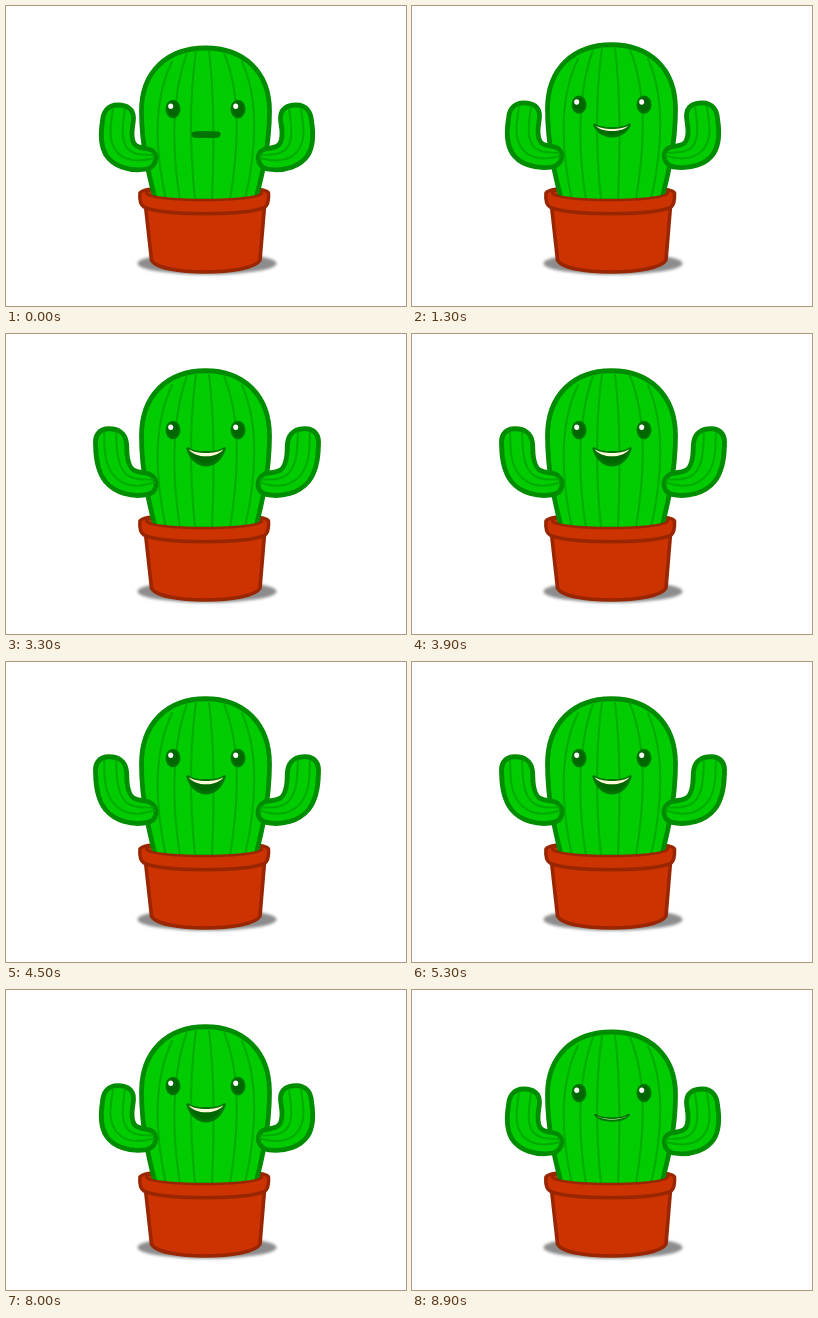
An HTML page that plays this animation: 400 px wide and 300 px high, repeating every 9000 ms.

```html
<!DOCTYPE html>
<html lang="en">
<head>
<meta charset="utf-8">
<title>Cactus</title>
<style>
  html, body { margin: 0; width: 100%; height: 100%; overflow: hidden; background: #fff; }
  svg { display: block; width: 100%; height: 100%; }
  .skin { fill: #0c0; stroke: #008c00; stroke-width: 4.8; stroke-linejoin: round; }
  .stripe { fill: none; stroke: #00ab00; stroke-width: 2; stroke-linecap: round; }
  .clay { fill: #c30; stroke: #992600; stroke-width: 3.6; stroke-linejoin: round; }
  .dark { fill: #060; stroke: #007400; stroke-linejoin: round; stroke-linecap: round; }
  .rim { fill: none; stroke: #992600; stroke-width: 2.4; }
</style>
</head>
<body>
<svg viewBox="0 0 400 300">
  <defs>
    <filter id="blur" x="-10%" y="-50%" width="120%" height="200%"><feGaussianBlur stdDeviation="1.6"/></filter>
    <clipPath id="abovePot"><path d="M0 0H400V187H256A58 7 0 0 1 140 187H0Z"/></clipPath>
    <g id="arm">
      <path class="skin" d="M112 99C101 99 97 107 96.500 115C94.500 127 94 139 100 149C107 160 123 166 141 163C152 160 153 145 142 143C130 141 126 140 126 127C126 121 127.500 117 127.500 112C127.500 103 121 99 112 99Z"/>
      <path class="stripe" d="M107 103C104 122 102 135 111 146C120 156 134 156 148 152M119 103C116 122 115 136 122 143C128 149 138 149 147 149"/>
    </g>
    <g id="eye">
      <ellipse class="dark" rx="6.500" ry="8.200" stroke-width="2"/>
      <ellipse cx="-2.300" cy="-2.700" rx="2.500" ry="2.700" fill="#fff"/>
    </g>
  </defs>

  <ellipse cx="201" cy="257.500" rx="69.500" ry="11" fill="#8c8c8c" filter="url(#blur)"/>
  <g id="figure">
    <path class="clay" d="M139.500 200L145.500 254C152 270 246 270 254 254L258.500 200Z"/>
    <path class="clay" d="M134 187C136 178 262 178 262.500 187Q263 198 259 201C242 210 156 210 138 201Q133 198 134 187Z"/>
    <ellipse class="rim" cx="198" cy="187" rx="58" ry="6"/>
    <g clip-path="url(#abovePot)">
      <g id="body">
        <path class="skin" d="M151 200C143 170 135.500 140 135.500 105C135.500 65 162 42 199.500 42C237 42 263.500 65 263.500 105C263.500 140 256 170 248 200Z"/>
        <path class="stripe" d="M166 56C148 92 148 140 160 194M181 47C165 90 166 145 174 194M190 45C183 95 184 145 189 194M203 45C209 95 208 145 206 194M218 47C236 90 232 145 224 194M236 56C254 95 250 145 239 194"/>
      </g>
    </g>
    <path class="rim" d="M140 187A58 7 0 0 0 256 187"/>
    <g id="face">
      <use href="#eye" x="167"/>
      <use href="#eye" x="232" id="rightEye"/>
      <path id="wink" d="M225.500 2Q232 -8 238.500 2" fill="none" stroke="#060" stroke-width="4" stroke-linecap="round"/>
      <g id="mouth">
        <path id="lips" class="dark"/>
        <path id="teeth" fill="#fffbd8"/>
      </g>
    </g>
    <use href="#arm" id="leftArm"/>
    <g transform="translate(402) scale(-1 1)"><use href="#arm" id="rightArm"/></g>
  </g>
</svg>
<script>
const $ = id => document.getElementById(id);
const set = (id, name, value) => $(id).setAttribute(name, value);
const show = (id, on) => set(id, 'visibility', on ? 'visible' : 'hidden');
const clamp = x => Math.min(1, Math.max(0, x));
const mix = (a, b, p) => a.map((v, i) => v + (b[i] - v) * p);

// half width, corner y, upper lip y, lower lip y, outline width, teeth height
const FLAT = [11.5, 25.5, 25, 26, 6, 0];
const THIN = [16.5, 22, 25.5, 27.5, 2.6, 1];
const OPEN = [18.3, 18.5, 22.5, 35, 2.8, 3.8];

// rotation, width, length along the elbow-to-tip axis, y shift
const REST = [0, 1, 1, 0];
const INWARD = [-13, 0.96, 1.1, -5];
const OUTWARD = [25.5, 0.96, 1.1, 5.4];

const ARM_AXIS = 34;
const WAVE_STEPS = 38;

function armPose(step) {
  const key = k => k <= 0 || k >= WAVE_STEPS / 2 ? REST : k % 2 ? INWARD : OUTWARD;
  const k = Math.floor(step / 2);
  return mix(key(k), key(k + 1), step / 2 - k);
}

function drawMouth(open) {
  const [w, corner, upper, lower, line, teeth] =
    open < 0.2 ? mix(FLAT, THIN, open / 0.2) : mix(THIN, OPEN, (open - 0.2) / 0.8);
  const crescent = (half, y, top, bottom) => {
    const curve = (side, mid) => {
      const bend = (4 * mid - y) / 3;
      return `C${200 - side * half * 0.65} ${bend} ${200 + side * half * 0.65} ${bend} ${200 + side * half} ${y}`;
    };
    return `M${200 - half} ${y}${curve(1, top)}${curve(-1, bottom)}Z`;
  };
  set('lips', 'd', crescent(w, corner, upper, lower));
  set('lips', 'stroke-width', line);
  set('teeth', 'd', crescent(w - 1, corner + 0.7, upper + 0.4, upper + teeth));
  show('teeth', open > 0);
}

function draw(frame) {
  const rise = clamp((frame - 8) / 8);
  const stretch = rise - clamp((frame - 85) / 4);
  const smile = rise - clamp((frame - 85) / 5);

  const hop = frame - 18;
  const squash = hop > 0 && hop < 5 ? 5 * Math.sin(Math.PI * hop / 5) : 0;
  const lift = hop > 3.65 && hop < 8 ? 9 * Math.sin(Math.PI * (hop - 3.65) / 4.35) : 0;
  const grow = 5.3 * stretch - squash;

  set('figure', 'transform', `translate(0 ${-lift})`);
  set('body', 'transform', `translate(0 191) scale(1 ${1 + grow / 151}) translate(0 -191)`);
  set('face', 'transform', `translate(0 ${103 - 7 * stretch + 0.25 * squash})`);

  const [angle, width, length, dy] = armPose(frame - 28);
  const arm = `translate(139 ${152 - 0.65 * grow + dy}) rotate(${-angle - ARM_AXIS}) ` +
    `scale(${width} ${length}) rotate(${ARM_AXIS}) translate(-139 -152)`;
  set('leftArm', 'transform', arm);
  set('rightArm', 'transform', arm);

  const winking = frame >= 70 && frame < 80;
  show('rightEye', !winking);
  show('wink', winking);
  set('mouth', 'transform', `rotate(${winking ? -4 : 0} 200 26)`);
  drawMouth(smile);
}

const start = performance.now();
function tick() {
  draw(Math.floor((performance.now() - start) / 100) % 90);
  requestAnimationFrame(tick);
}
tick();
</script>
</body>
</html>
```
